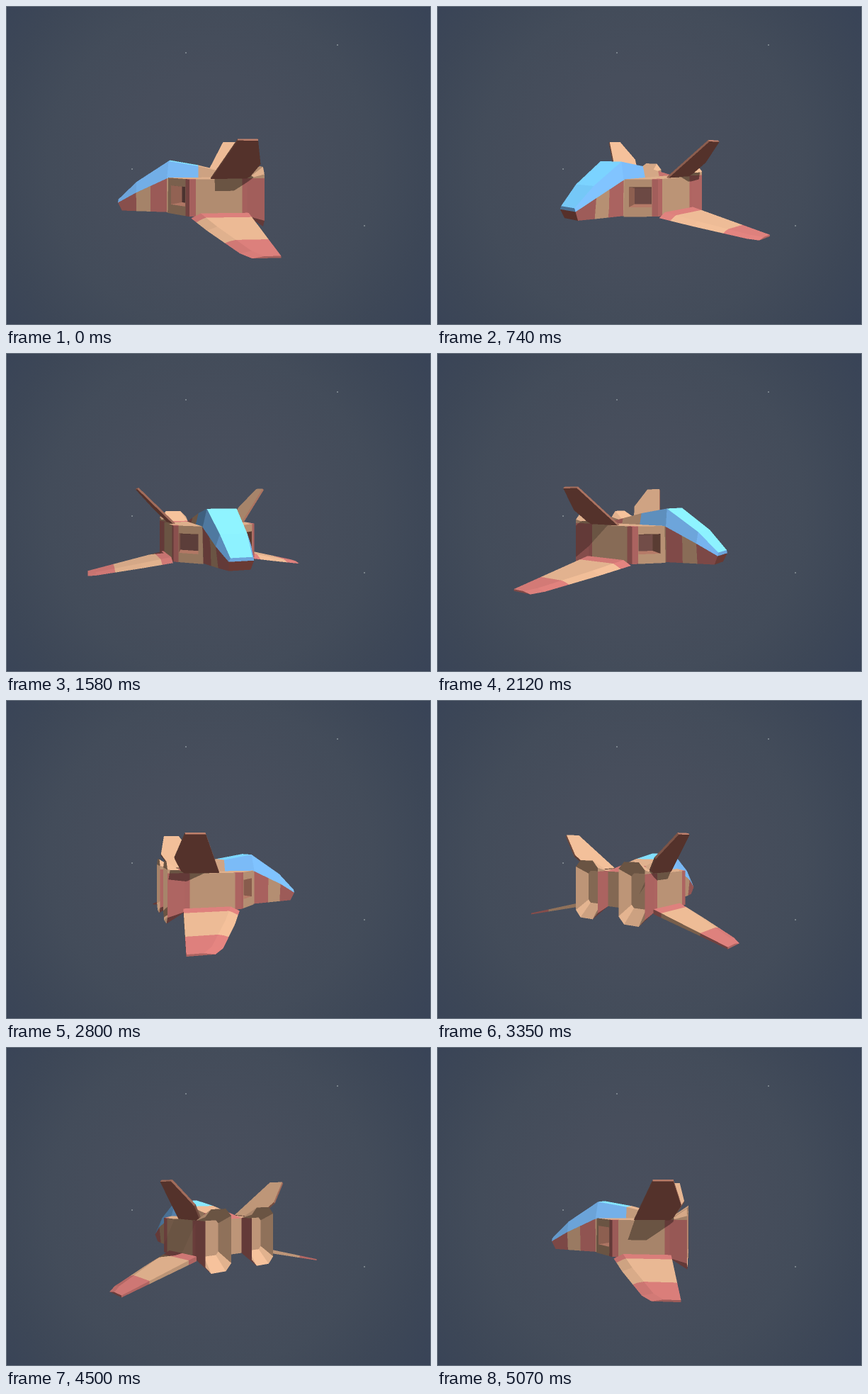
These frames come from a looping animation (600x450 px, 5.15 s). An HTML page with a canvas:

```html
<!DOCTYPE html>
<html lang="en">
<head>
<meta charset="utf-8">
<title>Low poly ship</title>
<style>
  html, body { margin: 0; width: 100%; height: 100%; overflow: hidden; }
  body {
    position: relative;
    background: radial-gradient(circle at 290px 225px, #494f5d 0, #474e5c 130px, #434c5a 230px, #3d4757 310px, #384357 390px);
    box-shadow: inset 0 0 0 1px #6c7682;
  }
  canvas { position: absolute; left: 100px; top: 176px; width: 376px; height: 192px; }
  i { position: absolute; width: 2px; height: 2px; border-radius: 1px; background: #8b959b; }
</style>
</head>
<body>
<i style="left:253px;top:65px"></i>
<i style="left:467px;top:54px"></i>
<i style="left:177px;top:229px"></i>
<i style="left:505px;top:309px"></i>
<canvas width="752" height="384"></canvas>
<script>
const LOOP = 5150, STEP = 77.9, LAST = 64;
const CAM = 540, TILT = 0.04, AXIS = -13;
const LEFT = 100, TOP = 176, RES = 2;

// Points are [x right, y down, z forward] in ship space.
const tan = [242, 191, 153], pink = [226, 131, 127], brown = [190, 114, 98];
const rust = [195, 108, 96], dusk = [150, 102, 95], edge = [190, 128, 108];
const glass = [142, 216, 286], shine = [140, 240, 296];

const stripes = (x, y, z) =>
  z > 99 || (z > 58 && z < 80) || (z < -39 && y > 14) || (z > 20 && z < 33 && Math.abs(x) > 50) ? pink : tan;
const wingPaint = x => Math.abs(x) < 70 || Math.abs(x) > 128 ? pink : tan;
const deckPaint = (x, y, z) => z < -15 ? pink : tan;

const faces = [];
const sub = (a, b) => a.map((v, i) => v - b[i]);
const dot = (a, b) => a[0] * b[0] + a[1] * b[1] + a[2] * b[2];
const cross = (a, b) => [a[1] * b[2] - a[2] * b[1], a[2] * b[0] - a[0] * b[2], a[0] * b[1] - a[1] * b[0]];

function face(pts, paint, lit) {
  const n = cross(sub(pts[2], pts[0]), sub(pts[3] || pts[1], pts[3] ? pts[1] : pts[0]));
  const len = Math.hypot(...n);
  if (len > 1e-6) faces.push({ pts, paint, lit, n: n.map(v => v / len) });
}

// Skin between two loops with the same number of points.
function loft(a, b, paint, lit) {
  a.forEach((p, i) => {
    const j = (i + 1) % a.length;
    face([p, a[j], b[j], b[i]], paint, lit);
  });
}

// Four-cornered section across the fuselage.
const section = (topW, lowW, y0, y1, z0, z1 = z0) =>
  [[topW, y0, z0], [-topW, y0, z0], [-lowW, y1, z1], [lowW, y1, z1]];

// Chamfered rectangle; z runs from the inner to the outer side.
function box(side, x0, x1, y0, y1, z0, z1, c) {
  const point = (x, y) => [side * x, y, z0 + (z1 - z0) * (x - x0) / (x1 - x0)];
  return [
    point(x0 + c, y0), point(x1 - c, y0), point(x1, y0 + c), point(x1, y1 - c),
    point(x1 - c, y1), point(x0 + c, y1), point(x0, y1 - c), point(x0, y0 + c)
  ];
}

function buildBody() {
  const hull = [
    section(15, 13, 49, 60, 124, 119), section(22, 19, 35, 60, 99),
    section(26, 25, 16, 61, 58), section(24, 24, 15, 62, 16), section(21, 21, 15, 62, -45)
  ];
  const canopy = [
    section(13, 15, 45, 49, 124), section(17, 22, 21, 35, 99),
    section(20, 26, -7, 16, 56, 58), section(20, 24, 0, 15, 16)
  ];
  face(hull[0], rust);
  face(canopy[0], glass);
  for (let i = 0; i < 4; i++) loft(hull[i], hull[i + 1], stripes);
  for (let i = 0; i < 3; i++) {
    const a = canopy[i], b = canopy[i + 1];
    face([a[0], a[1], b[1], b[0]], shine);
    face([a[1], a[2], b[2], b[1]], glass);
    face([a[3], a[0], b[0], b[3]], glass);
  }
  loft(canopy[3], section(21, 21, 15, 16, -45), deckPaint);
  face(hull[4], tan);
  const lamp = (x, z) => [x, 0.246 * (16 - z) - 0.7, z];
  face([lamp(7, -18), lamp(-7, -18), lamp(-9, -29), lamp(9, -29)], tan);
}

function buildNacelle(side) {
  const front = box(side, 25, 57, 15, 62, 57, 28, 0);
  const lip = box(side, 30, 51, 25, 50, 52.5, 33.4, 0);
  const throat = box(side, 26, 46, 27, 48, 38, 20, 0);
  const rear = box(side, 20, 57, 15, 62, -45, -45, 0);
  const flare = box(side, 18, 59, 0, 77, -67, -67, 9);
  const nozzle = box(side, 25, 52, 15, 59, -50, -50, 4);
  loft(front, lip, stripes);
  loft(lip, throat, edge);
  face(throat.filter((p, i) => i % 2), dusk);
  loft(front, rear, stripes);
  loft(rear, flare, stripes);
  loft(flare, nozzle, tan);
  face(nozzle, tan);
}

function buildWing(side) {
  const plan = [[57, 26], [95, 8], [152, -23], [163, -34], [163, -63], [57, -47]];
  const skin = (root, tip, ridge) => plan.map(([x, z], i) => {
    const u = (x - 57) / 106;
    return [side * x, 62 + 23 * u + root + (tip - root) * u, i < 4 ? z - ridge : z];
  });
  const top = skin(-4, -1, 12), low = skin(2, 1, 0);
  face(top, wingPaint);
  face(low, wingPaint);
  loft(top, low, wingPaint);
}

function buildFin(side) {
  const plan = [[50, 1], [50, -47], [69, -60], [96, -52], [96, -28]];
  const skin = d => plan.map(([x, z]) => [side * (x + d), 15 - 1.0625 * (x - 50) + d, z]);
  const inner = skin(-1), outer = skin(1);
  face(inner, tan, true);
  face(outer, brown, true);
  loft(inner, outer, edge, true);
}

buildBody();
for (const side of [1, -1]) {
  buildNacelle(side);
  buildWing(side);
  buildFin(side);
}

const canvas = document.querySelector("canvas");
const ctx = canvas.getContext("2d");
const W = canvas.width, H = canvas.height;
const image = ctx.createImageData(W, H);
const depth = new Float32Array(W * H);
let light, eye, sin, cos;

function project([x, y, z]) {
  const near = x * sin + z * cos;
  const s = CAM / (CAM - near);
  return [
    (300 + s * (AXIS - x * cos + z * sin) - LEFT) * RES,
    (225 + s * (y + TILT * near) - TOP) * RES,
    s, x * s, y * s, z * s
  ];
}

// Does either fin stand between this point and the light?
function shaded(x, y, z) {
  for (const side of [1, -1]) {
    const gap = y - 15 + 1.0625 * (side * x - 50);
    const k = -gap / (light[1] + 1.0625 * side * light[0]);
    if (k < 0.5) continue;
    const u = (side * (x + k * light[0]) - 50) / 46;
    if (u < 0 || u > 1) continue;
    const hit = z + k * light[2];
    const back = u < 0.41 ? -47 - 32 * u : -60 + 14 * (u - 0.41);
    if (hit < 1 - 29 * u && hit > back) return true;
  }
  return false;
}

function fill(a, b, c, f, glow) {
  const area = (b[0] - a[0]) * (c[1] - a[1]) - (b[1] - a[1]) * (c[0] - a[0]);
  if (Math.abs(area) < 1e-4) return;
  const low = i => Math.max(0, Math.floor(Math.min(a[i], b[i], c[i])));
  const high = (i, end) => Math.min(end - 1, Math.ceil(Math.max(a[i], b[i], c[i])));
  const x1 = high(0, W), y1 = high(1, H);
  for (let py = low(1); py <= y1; py++) {
    for (let px = low(0); px <= x1; px++) {
      const x = px + 0.5, y = py + 0.5;
      const u = ((b[0] - x) * (c[1] - y) - (b[1] - y) * (c[0] - x)) / area;
      const v = ((c[0] - x) * (a[1] - y) - (c[1] - y) * (a[0] - x)) / area;
      const w = 1 - u - v;
      if (u < 0 || v < 0 || w < 0) continue;
      const s = u * a[2] + v * b[2] + w * c[2];
      const at = py * W + px;
      if (s <= depth[at]) continue;
      depth[at] = s;
      const mix = i => (u * a[i] + v * b[i] + w * c[i]) / s;
      const X = mix(3), Y = mix(4), Z = mix(5);
      const rgb = typeof f.paint === "function" ? f.paint(X, Y, Z) : f.paint;
      const level = 0.44 + (glow > 0 && (f.lit || !shaded(X, Y, Z)) ? 0.59 * glow : 0);
      for (let i = 0; i < 3; i++) image.data[at * 4 + i] = rgb[i] * level;
      image.data[at * 4 + 3] = 255;
    }
  }
}

function draw(step) {
  const turn = (-85.5 + 5.45 * step) * Math.PI / 180;
  sin = Math.sin(turn);
  cos = Math.cos(turn);
  const toShip = (x, y, near) => [-x * cos + near * sin, y, x * sin + near * cos];
  light = toShip(0.34, -0.81, 0.47);
  eye = toShip(-AXIS, -TILT * CAM, CAM);
  depth.fill(0);
  image.data.fill(0);
  for (const f of faces) {
    const facing = Math.sign(dot(f.n, sub(eye, f.pts[0])));
    const glow = facing * dot(f.n, light);
    const p = f.pts.map(project);
    for (let i = 2; i < p.length; i++) fill(p[0], p[i - 1], p[i], f, glow);
  }
  ctx.putImageData(image, 0, 0);
}

let shown = -1;
function tick() {
  const t = performance.now() % LOOP;
  const step = t < 160 ? 0 : Math.min(LAST, 1 + Math.floor((t - 150) / STEP));
  if (step !== shown) draw(shown = step);
  requestAnimationFrame(tick);
}
tick();
</script>
</body>
</html>
```
